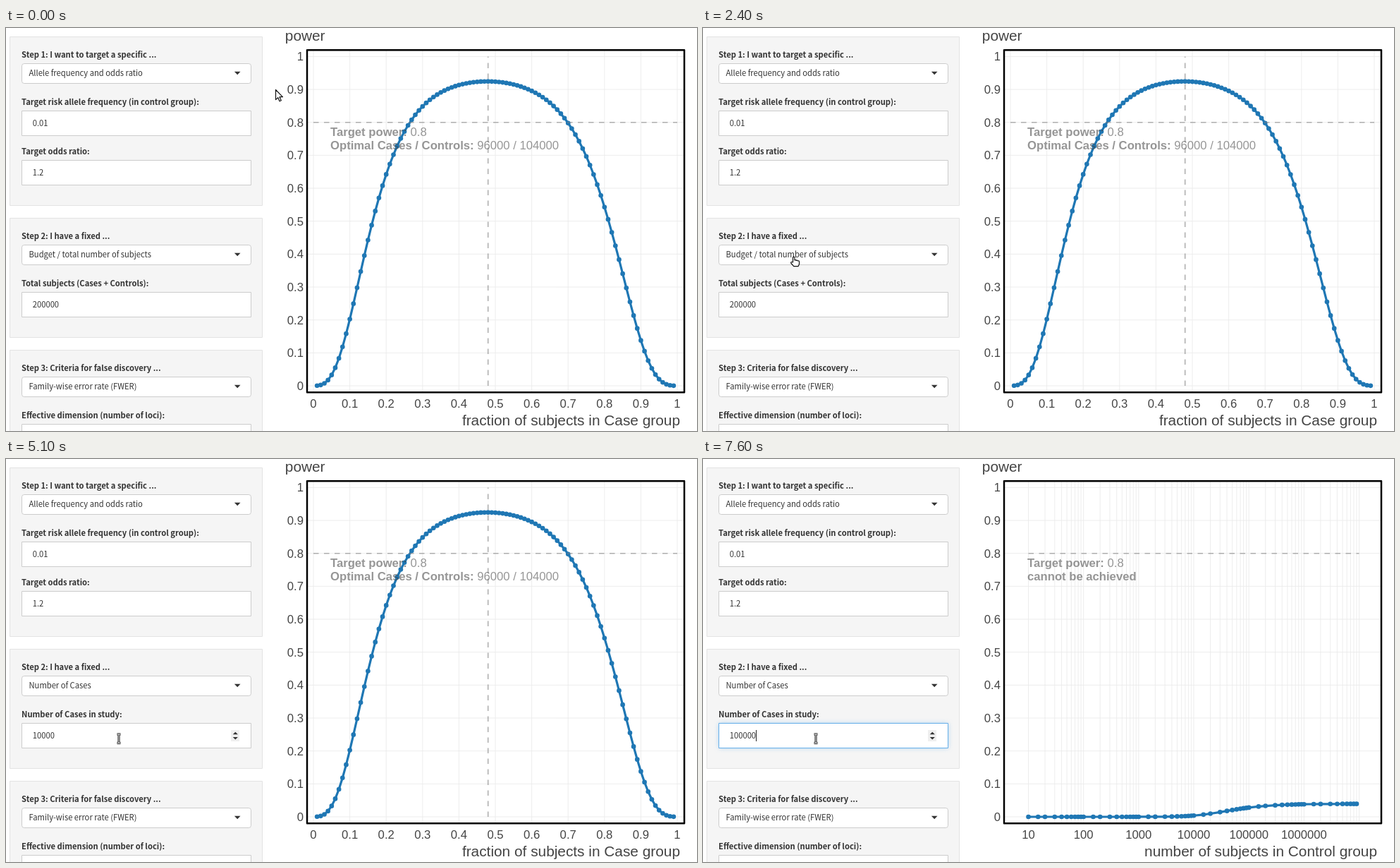
An HTML page with a canvas for the animation above (8000 ms loop, 980x571 px).

```html
<!DOCTYPE html>
<html lang="en">
<head>
<meta charset="utf-8">
<title>Power calculator</title>
<style>
html, body { margin: 0; width: 100%; height: 100%; overflow: hidden; background: #fff; }
canvas { display: block; }
</style>
</head>
<body>
<canvas id="stage" width="980" height="571"></canvas>
<script>
const ctx = document.getElementById('stage').getContext('2d');
const LOOP = 8000;
const FORM = '11.19px "Noto Sans CJK JP", "Noto Sans CJK SC", "Noto Sans CJK KR", "Noto Sans CJK TC", "Noto Sans CJK", sans-serif';
const ARIAL = '"Liberation Sans", Arial, sans-serif';
const TICK = '16.67px ' + ARIAL;
const TITLE = '20.83px ' + ARIAL;
const BLUE = '#1f77b4';
const BUDGET = 'Budget / total number of subjects';
const OPTIONS = ['Select a constraint', BUDGET, 'Number of Cases', 'Fraction of Cases'];
const ROW_TOP = 341.8, ROW_H = 21.8;

function text(str, x, y, font = FORM, color = '#333', align = 'left') {
  ctx.font = font;
  ctx.fillStyle = color;
  ctx.textAlign = align;
  ctx.fillText(str, x, y);
  return x + ctx.measureText(str).width;
}

function line(x1, y1, x2, y2) {
  ctx.beginPath();
  ctx.moveTo(x1, y1);
  ctx.lineTo(x2, y2);
  ctx.stroke();
}

function box(x, y, w, h, { r = 0, fill = '#fff', border = '#ccc', glow = 0 } = {}) {
  ctx.beginPath();
  ctx.roundRect(x + 0.5, y + 0.5, w - 1, h - 1, r);
  ctx.save();
  if (glow) {
    ctx.shadowColor = `rgba(102,175,233,${0.6 * glow})`;
    ctx.shadowBlur = 6.7;
  }
  ctx.fillStyle = fill;
  ctx.fill();
  ctx.restore();
  ctx.lineWidth = 1;
  ctx.strokeStyle = border;
  ctx.stroke();
  if (glow) {
    ctx.strokeStyle = `rgba(102,175,233,${glow})`;
    ctx.stroke();
  }
}

function triangle(x, y, half, dir) {
  ctx.fillStyle = '#333';
  ctx.beginPath();
  ctx.moveTo(x - half, y - dir * half / 2);
  ctx.lineTo(x + half, y - dir * half / 2);
  ctx.lineTo(x, y + dir * half / 2);
  ctx.fill();
}

function caret(x, y, h) {
  ctx.fillStyle = '#222';
  ctx.fillRect(Math.floor(x), y, 1, h);
}

// ---------- form ----------

const panel = (y, h) => box(5, y, 359, h, { fill: '#f5f5f5', border: '#e3e3e3' });
const label = (str, y) => text(str, 22, y + 4.5, 'bold ' + FORM);

function select(str, y, open) {
  box(22, y, 326, 29, { r: 3.3, glow: open ? 1 : 0 });
  triangle(328.2, y + 14, 4.3, open ? -1 : 1);
  return text(str, 32.5, y + 18.3);
}

function input(str, y, glow = 0) {
  box(22, y, 326, 36, { glow });
  return text(str, 37.8, y + 22.3);
}

function spinner() {
  ctx.fillStyle = '#efefef';
  ctx.fillRect(319, 384, 12, 16);
  triangle(325.3, 388.5, 3.6, -1);
  triangle(325.3, 395.7, 3.6, 1);
}

function dropdown(active) {
  ctx.save();
  ctx.shadowColor = 'rgba(0,0,0,.19)';
  ctx.shadowBlur = 10;
  ctx.shadowOffsetY = 5;
  ctx.fillStyle = '#fff';
  ctx.beginPath();
  ctx.roundRect(22, 337, 326, 97, 3.3);
  ctx.fill();
  ctx.restore();
  box(22, 337, 326, 97, { r: 3, border: '#d2d2d2' });
  OPTIONS.forEach((name, i) => {
    const y = ROW_TOP + i * ROW_H;
    if (i === active) {
      ctx.fillStyle = '#f5f5f5';
      ctx.fillRect(23, y, 324, ROW_H);
    }
    text(name, 32.5, y + 15);
  });
}

function drawForm(t, pos) {
  const open = t >= 3500 && t < 5100;
  const byCases = t >= 5100;

  panel(12, 240);
  label('Step 1: I want to target a specific ...', 37);
  select('Allele frequency and odds ratio', 50);
  label('Target risk allele frequency (in control group):', 104);
  input('0.01', 117);
  label('Target odds ratio:', 174);
  input('1.2', 187);

  panel(269, 170);
  label('Step 2: I have a fixed ...', 294);
  const end = select(byCases ? 'Number of Cases' : BUDGET, 307, open);
  if (open && (t < 4000 || t >= 4500)) caret(end, 314, 15);
  label(byCases ? 'Number of Cases in study:' : 'Total subjects (Cases + Controls):', 361);
  if (byCases) {
    const glow = Math.min(1, Math.max(0, Math.floor((t - 6300) / 100) / 2));
    const x = input(t < 7300 ? '10000' : '100000', 374, glow);
    if (t >= 6300 && (t < 6900 || t >= 7300)) caret(x, 384, 16);
    spinner();
  } else {
    input('200000', 374);
  }

  panel(456, 140);
  label('Step 3: Criteria for false discovery ...', 481);
  select('Family-wise error rate (FWER)', 494);
  label('Effective dimension (number of loci):', 548);
  input('', 561);

  if (open) {
    const row = Math.floor((pos.y - ROW_TOP) / ROW_H);
    dropdown(row >= 0 && row < 4 ? row : 1);
  }
}

// ---------- statistics ----------

function normalCdf(z) {
  const u = 1 / (1 + 0.2316419 * Math.abs(z));
  const poly = u * (0.31938153 + u * (-0.356563782 + u * (1.781477937 + u * (-1.821255978 + u * 1.330274429))));
  const tail = Math.exp(-z * z / 2) / Math.sqrt(2 * Math.PI) * poly;
  return z > 0 ? 1 - tail : tail;
}

// Power of an allelic test: frequency 0.01, odds ratio 1.2, level 5e-6.
function power(cases, controls) {
  const p0 = 0.01, p1 = 0.012 / 1.002;
  const n = cases + controls, phi = cases / n;
  const mean = p0 + phi * (p1 - p0);
  const ncp = 2 * n * phi * (1 - phi) * (p1 - p0) ** 2 / (mean * (1 - mean));
  return normalCdf(Math.sqrt(ncp) - 4.565);
}

// ---------- plot ----------

const linX = v => 436 + 516 * v;
const logX = v => 461.5 + 78.17 * (Math.log10(v) - 1);
const plotY = v => 507 - 466.6 * v;

const decades = [1, 2, 3, 4, 5, 6].map(k => 10 ** k);
const steps = [1, 2, 3, 4, 5, 6, 7, 8, 9];
const logGrid = decades.flatMap(d => steps.map(k => k * d)).concat(1e7);
const logVals = decades.flatMap(d => [1, 1.5, ...steps.slice(1)].map(k => k * d));

const fractionPlot = {
  grid: Array.from({ length: 11 }, (_, i) => linX(i / 10)),
  ticks: Array.from({ length: 11 }, (_, i) => [linX(i / 10), String(i / 10)]),
  points: Array.from({ length: 99 }, (_, i) => {
    const f = (i + 1) / 100;
    return [linX(f), plotY(power(2e5 * f, 2e5 * (1 - f)))];
  }),
  span: [linX(0), linX(1)],
  best: linX(0.48),
  title: 'fraction of subjects in Case group',
  note: ['Optimal Cases / Controls:', ' 96000 / 104000']
};

const controlPlot = {
  grid: logGrid.map(logX),
  ticks: decades.map(d => [logX(d), String(d)]),
  points: logVals.map(c => [logX(c), plotY(power(1e4, c))]),
  span: [logX(10), logX(1e7)],
  title: 'number of subjects in Control group',
  note: ['cannot be achieved', '']
};

function note(bold, plain, y) {
  const color = 'rgba(68,68,68,.56)';
  const x = text(bold, 460, y, 'bold ' + TICK, color);
  text(plain, x, y, TICK, color);
}

function drawPlot(p) {
  ctx.lineWidth = 0.85;
  ctx.strokeStyle = '#eaeaea';
  for (const x of p.grid) line(x, 32, x, 516);
  for (let i = 0; i <= 10; i++) line(428, plotY(i / 10), 961, plotY(i / 10));

  ctx.strokeStyle = ctx.fillStyle = BLUE;
  ctx.lineWidth = 3.2;
  ctx.lineJoin = 'round';
  ctx.beginPath();
  p.points.forEach(([x, y]) => ctx.lineTo(x, y));
  ctx.stroke();
  for (const [x, y] of p.points) {
    ctx.beginPath();
    ctx.arc(x, y, 3.33, 0, 7);
    ctx.fill();
  }

  ctx.strokeStyle = 'rgba(128,128,128,.6)';
  ctx.lineWidth = 1.67;
  ctx.setLineDash([7.5, 7.5]);
  line(p.span[0], plotY(0.8), p.span[1], plotY(0.8));
  if (p.best) line(p.best, plotY(0), p.best, plotY(1));
  ctx.setLineDash([]);

  note('Target power:', ' 0.8', 153);
  note(p.note[0], p.note[1], 172);

  ctx.strokeStyle = '#000';
  ctx.lineWidth = 2.5;
  ctx.strokeRect(427, 31.3, 535, 485);

  for (let i = 0; i <= 10; i++) text(String(i / 10), 422, plotY(i / 10) + 6, TICK, '#444', 'right');
  for (const [x, name] of p.ticks) text(name, x, 538, TICK, '#444', 'center');
  text('power', 395.8, 18, TITLE, '#444');
  text(p.title, 956, 562.5, TITLE, '#444', 'right');
}

// ---------- pointer ----------

// start time, number of 100 ms steps, end point
const MOVES = [
  [400, 9, 76, 349],
  [1300, 4, 48, 331],
  [1800, 7, 129, 326],
  [3500, 1, 186, 326],
  [3900, 7, 160, 395.5]
];

function pointerAt(t) {
  let x = 382, y = 87;
  for (const [start, n, tx, ty] of MOVES) {
    if (t < start) break;
    const u = Math.min(1, (Math.floor((t - start) / 100) + 1) / n);
    const e = u * u * (3 - 2 * u);
    x += (tx - x) * e;
    y += (ty - y) * e;
  }
  return { x, y };
}

function pointerKind(t, { x, y }) {
  const open = t >= 3500 && t < 5100;
  const within = (a, b) => x >= 22 && x <= 348 && y >= a && y <= b;
  if (open && within(337, 434)) return 'hand';
  if (within(307, 336)) return open ? 'beam' : 'hand';
  if (within(50, 79)) return 'hand';
  if (within(117, 153) || within(187, 223) || within(374, 410)) return 'beam';
  return 'arrow';
}

const SHAPES = {
  arrow: new Path2D('M.5 .5V14.6L3.7 11.6L6 16.8L8.3 15.8L6 10.7H10.4Z'),
  hand: new Path2D('M-1.5 6V-.8Q-.2 -2.8 1 -.8V3Q2.2 2 3.3 3.4Q4.4 2.6 5.4 3.9Q7.5 3.3 7.5 5.5V8.5L6 11.7H-.3L-4.3 7Q-4.6 4.6 -1.5 6Z'),
  beam: new Path2D('M-2.5 -6H2.5M0 -6V6.5M-2.5 6.5H2.5')
};

function drawPointer(kind, { x, y }) {
  const shape = SHAPES[kind];
  ctx.save();
  ctx.translate(Math.round(x), Math.round(y));
  ctx.lineJoin = 'round';
  ctx.strokeStyle = '#111';
  if (kind === 'beam') {
    ctx.lineWidth = 3;
    ctx.stroke(shape);
    ctx.strokeStyle = '#fff';
    ctx.lineWidth = 1;
  } else {
    ctx.fillStyle = '#fff';
    ctx.fill(shape);
    ctx.lineWidth = 1.2;
  }
  ctx.stroke(shape);
  ctx.restore();
}

function render(t) {
  ctx.fillStyle = '#fff';
  ctx.fillRect(0, 0, 980, 571);
  const pos = pointerAt(t);
  drawForm(t, pos);
  if (t < 5200) drawPlot(fractionPlot);
  else if (t >= 5300) drawPlot(controlPlot);
  drawPointer(pointerKind(t, pos), pos);
}

const began = performance.now();
function tick() {
  render((performance.now() - began) % LOOP);
  requestAnimationFrame(tick);
}
tick();
</script>
</body>
</html>
```
